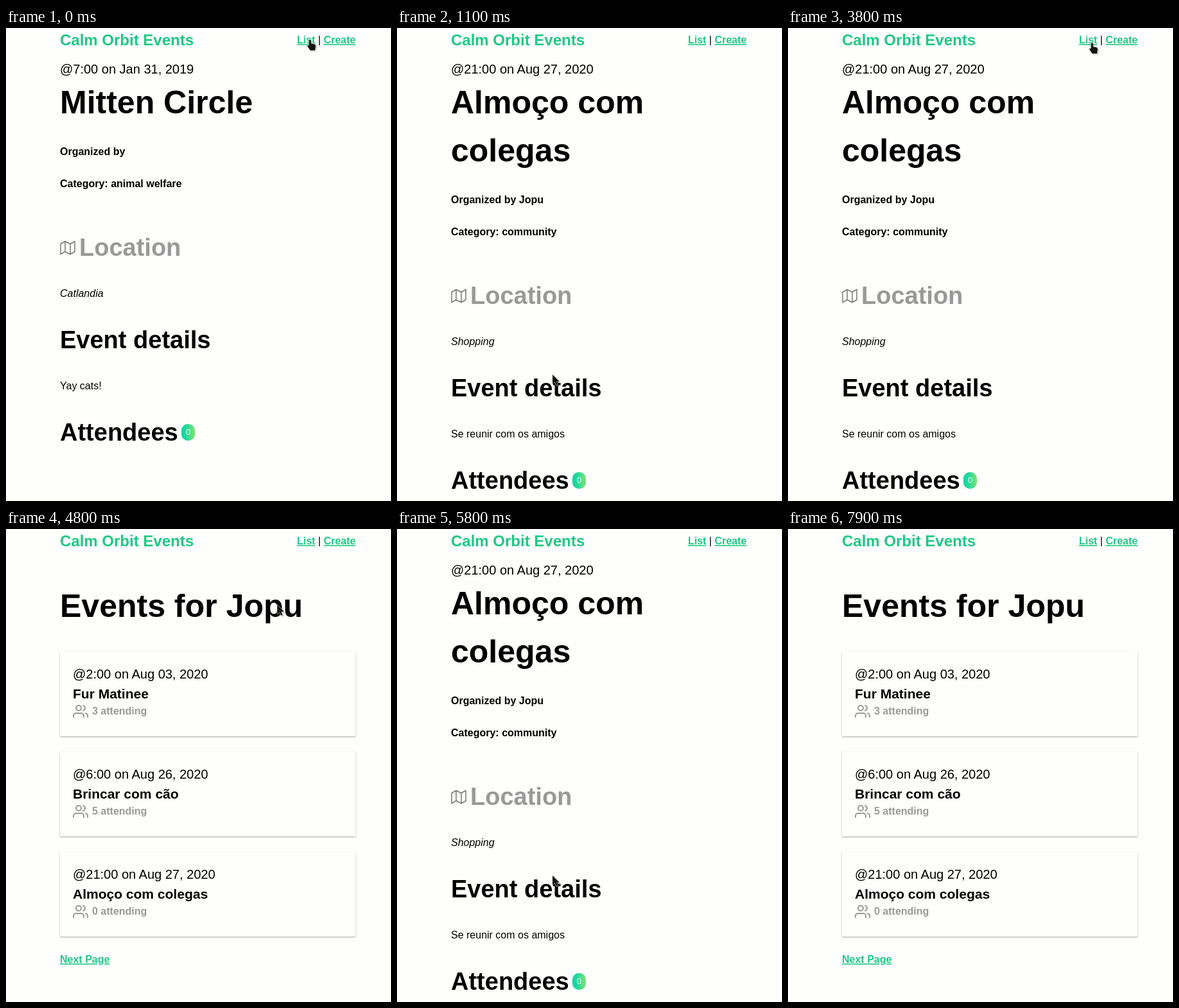
An HTML page that plays this animation: 599 by 737 pixels, repeating every 8800 ms.

```html
<!DOCTYPE html>
<html lang="en">
<head>
<meta charset="utf-8">
<title>Event pages</title>
<style>
  html, body { margin: 0; width: 100%; height: 100%; overflow: hidden; background: #fefefc; }
  svg { display: block; }
  text { font: 16px "Liberation Sans", Arial, sans-serif; white-space: pre; }
  .b { font-weight: bold; }
  .brand { font-size: 24px; fill: #1fc985; }
  .link { fill: #1fc985; text-decoration: underline; }
  .date { font-size: 20px; }
  .h1 { font-size: 50px; }
  .h2 { font-size: 38px; }
  .name { font-size: 21px; }
  .gray { fill: #999; }
  .place { font-style: italic; }
  .count { font-size: 13px; fill: #e8fff4; text-anchor: middle; }
  .card rect { fill: #fefefc; }
  .icon { fill: none; stroke: #999; stroke-width: 2; stroke-linecap: round; stroke-linejoin: round; }
  .map { stroke: #777; stroke-width: 1.5; }
  #cursor path { fill: #111; stroke: #fff; stroke-linejoin: round; paint-order: stroke; }
  #cursor { filter: drop-shadow(1px 1px 1px rgba(0,0,0,.35)); }
</style>
</head>
<body>
<svg width="599" height="737" viewBox="0 0 599 737">
  <defs>
    <linearGradient id="mint">
      <stop stop-color="#0fd6a6"/><stop offset=".35" stop-color="#22d89c"/><stop offset="1" stop-color="#82e272"/>
    </linearGradient>
  </defs>
  <g id="stage"></g>
  <g id="cursor">
    <path id="arrow" d="M0 0V15L3.5 11.6 6 17 8.3 16 6 10.8H10.5Z"/>
    <path id="hand" d="M-1.6 1Q0-.6 1.6 1V6L7.2 7.2Q9 8 8.8 10.5L7.7 16.8H.3L-4 10.5Q-4.2 8.2-2.4 8.8L-1.6 9.5Z"/>
  </g>
</svg>
<script>
const $ = id => document.getElementById(id);
const text = (x, y, cls, s) => `<text x="${x}" y="${y}" class="${cls}">${s}</text>`;
const page = (id, body) => `<g id="${id}">${body}</g>`;

const header = text(84, 27, 'b brand', 'Calm Orbit Events') +
  text(452.7, 24, 'b link', 'List') + text(485.6, 24, '', '|') + text(494.2, 24, 'b link', 'Create');

function eventPage(id, date, lines, host, category, place, details) {
  const dy = 75 * (lines.length - 1);
  return page(id, text(84, 71, 'date', date) +
    lines.map((s, i) => text(84, 133 + 75 * i, 'b h1', s)).join('') +
    `<g transform="translate(0 ${dy})">` +
    text(84, 198, 'b', 'Organized by ' + host) +
    text(84, 248, 'b', 'Category: ' + category) +
    `<path class="icon map" transform="translate(84 330.5)"
      d="M1 6V22L8 18 16 22 23 18V2L16 6 8 2ZM8 2V18M16 6V22"/>` +
    text(114, 355, 'b h2 gray', 'Location') + text(84, 419, 'place', place) +
    text(84, 499, 'b h2', 'Event details') + text(84, 563, '', details) +
    text(84, 643, 'b h2', 'Attendees') +
    '<rect x="272.8" y="617" width="21.2" height="26" rx="10" fill="url(#mint)"/>' +
    text(283.4, 634, 'count', '0') + '</g>');
}

function card(date, name, count) {
  return '<g class="card"><rect x="84" y="191" width="460" height="132" rx="1"/>' +
    text(104, 233, 'date', date) + text(104, 264, 'b name', name) +
    `<g class="icon" transform="translate(104 272)"><circle cx="9" cy="7" r="4"/>
      <path d="M17 21v-2a4 4 0 0 0-4-4H5a4 4 0 0 0-4 4v2M23 21v-2a4 4 0 0 0-3-3.87M16 3.13a4 4 0 0 1 0 7.75"/></g>` +
    text(134, 289, 'b gray', count + ' attending') + '</g>';
}

$('stage').innerHTML = header +
  eventPage('first', '@7:00 on Jan 31, 2019', ['Mitten Circle'], '', 'animal welfare', 'Catlandia', 'Yay cats!') +
  eventPage('second', '@21:00 on Aug 27, 2020', ['Almoço com', 'colegas'], 'Jopu', 'community',
    'Shopping', 'Se reunir com os amigos') +
  page('list', text(84, 137, 'b h1', 'Events for Jopu') +
    card('@2:00 on Aug 03, 2020', 'Fur Matinee', 3) +
    card('@6:00 on Aug 26, 2020', 'Brincar com cão', 5) +
    card('@21:00 on Aug 27, 2020', 'Almoço com colegas', 0) +
    text(84, 676, 'b link', 'Next Page'));

const LOOP = 8800, STEP = 100, FADE = 220, CARD_GAP = 156;
const cards = [...document.querySelectorAll('.card')];
const pages = [[0, 'first'], [100, 'list'], [1000, 'second'], [4100, 'list'], [5800, 'second'], [7600, 'list']];

// The pointer travels between a few places: start, end, destination
const link = [473, 18], lastCard = [242, 540];
const moves = [
  [0, 500, lastCard], [1200, 1800, link], [1800, 2300, [371, 252]], [2300, 2600, [364, 296]],
  [3000, 3800, [473, 23]], [4000, 4100, link], [4400, 4600, [456, 57]],
  [4700, 5300, [253, 421]], [5300, 5600, lastCard],
  [5800, 6300, [487, 122]], [6300, 6400, link], [6500, 6800, [533, 3]], [6800, 7300, link]];

const clamp = v => Math.max(0, Math.min(1, v));
const show = (id, on) => $(id).style.display = on ? '' : 'none';
const pageAt = t => pages.filter(p => p[0] <= t).pop()[1];

function pointer(t) {
  let [x, y] = link;
  for (const [start, end, to] of moves) {
    const p = clamp((t - start) / (end - start));
    x += (to[0] - x) * p;
    y += (to[1] - y) * p;
  }
  return [x, y];
}

function cardAt(t) {
  const [x, y] = pointer(t), top = y - 191;
  const inside = pageAt(t) === 'list' && x > 84 && x < 544 && top >= 0 && top % CARD_GAP < 132;
  return inside ? Math.floor(top / CARD_GAP) : -1;
}

// Share of the last moments that the pointer spent over card n, smoothed
function lift(n, t) {
  let v = 0;
  for (let ago = 0; ago < FADE; ago += 10)
    if (cardAt(Math.max(0, t - ago)) === n) v += 10 / FADE;
  return v * v * (3 - 2 * v);
}

function draw(now) {
  const t = Math.floor(now % LOOP / STEP) * STEP;
  for (const id of ['first', 'second', 'list']) show(id, id === pageAt(t));

  cards.forEach((el, n) => {
    const v = lift(n, t);
    el.setAttribute('transform',
      `translate(314 ${257 + CARD_GAP * n}) scale(${1 + .01 * v}) translate(-314 -257)`);
    el.firstChild.style.filter =
      `drop-shadow(0 ${1 + v}px ${1.2 + 1.8 * v}px rgba(0,0,0,${.36 + .06 * v}))`;
  });

  const [x, y] = pointer(t);
  const onLink = y > 9 && y < 29 && x > 452 && x < 545 && (x < 482 || x > 493);
  const hand = onLink || cardAt(t) >= 0;
  show('hand', hand);
  show('arrow', !hand);
  show('cursor', t < 7900);
  $('cursor').setAttribute('transform', `translate(${Math.round(x)} ${Math.round(y)})`);
}

const start = performance.now();
(function tick() {
  draw(performance.now() - start);
  requestAnimationFrame(tick);
})();
</script>
</body>
</html>
```
